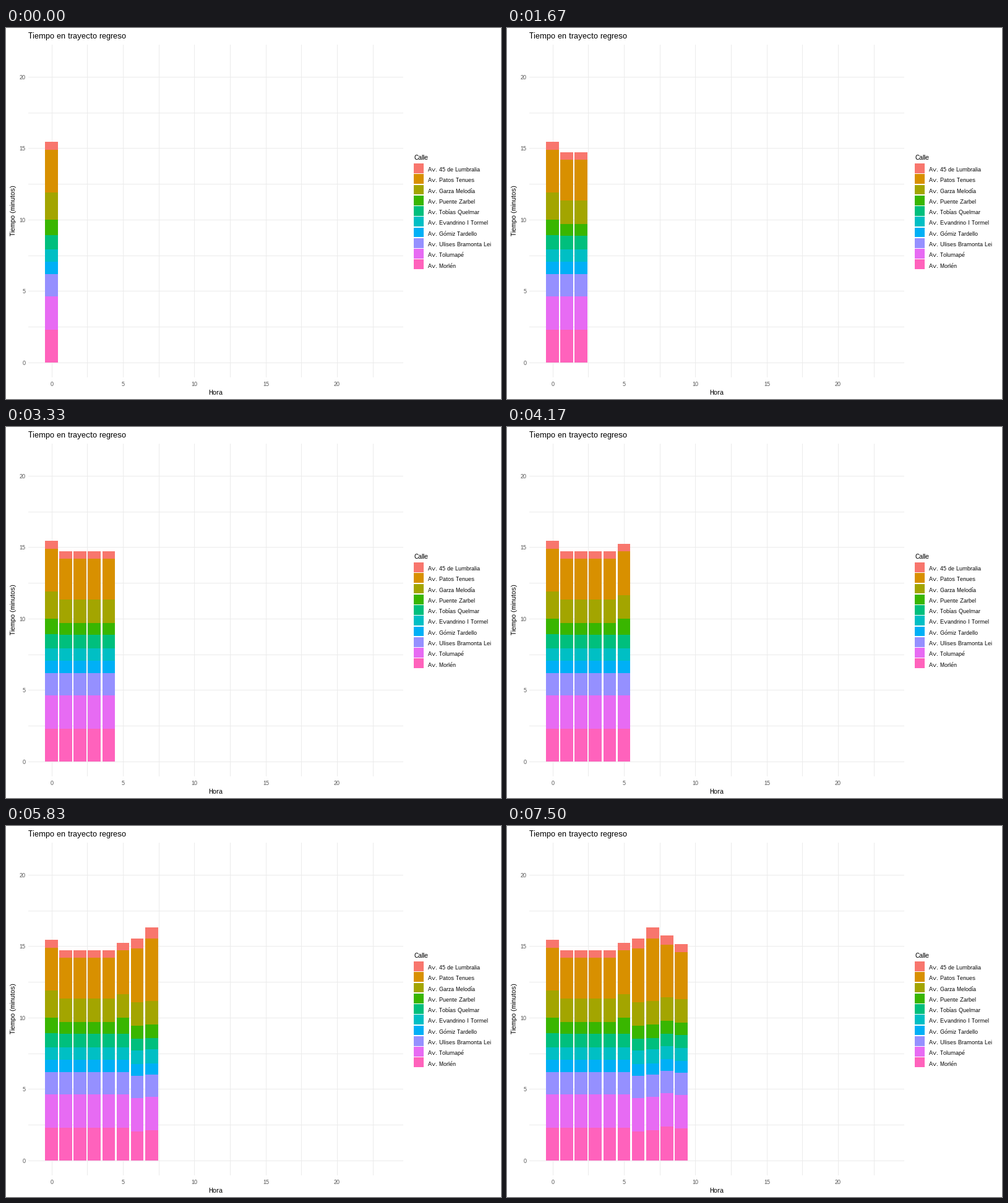
A matplotlib script for the animation above (8000 ms loop, 800 px wide and 600 px high).

```python
import math

import matplotlib.pyplot as plt
from matplotlib.animation import FuncAnimation
from matplotlib.collections import PatchCollection
from matplotlib.patches import Rectangle

W, H, DPI = 800, 600, 100
STEP_MS, LOOP_MS = 20, 8000
HOURS = 10
BASE, PITCH_X, PITCH_Y = 541, 23.08, 115.5
GRID, GREY = "#EBEBEB", "#4D4D4D"
SMALL, MEDIUM, LARGE = 9, 11, 13

# Name, colour and usual height in pixels, from the top of the stack down
STREETS = [
    ("Av. 45 de Lumbralia", "#F8766D", 12),
    ("Av. Patos Tenues", "#D89000", 66),
    ("Av. Garza Melodía", "#A3A500", 38),
    ("Av. Puente Zarbel", "#39B600", 19),
    ("Av. Tobías Quelmar", "#00BF7D", 22),
    ("Av. Evandrino I Tormel", "#00BFC4", 20),
    ("Av. Gómiz Tardello", "#00B0F6", 20),
    ("Av. Ulises Bramonta Lei", "#9590FF", 36),
    ("Av. Tolumapé", "#E76BF3", 54),
    ("Av. Morlén", "#FF62BC", 53),
]
NAMES, COLORS, USUAL = zip(*STREETS)
RED, ORANGE, OLIVE, GREEN, TEAL, CYAN, BLUE, PURPLE, VIOLET, PINK = range(10)

# Peak hour, rise and fall in hours, extra height per street
SURGES = [
    (0, 0.4, 0.2, {RED: 1, ORANGE: 3, OLIVE: 6, GREEN: 6, TEAL: 1}),
    (5, 0.4, 0.2, {GREEN: 7}),
    (6, 0.4, 2.0, {PINK: -6}),
    (7, 1.4, 1.6, {RED: 6, ORANGE: 35, GREEN: 3, TEAL: -4, CYAN: 3, BLUE: -2}),
    (8, 0.4, 0.2, {PINK: 4}),
]

plt.rcParams.update({
    "font.family": "Liberation Sans",
    "text.hinting": "native",
    "text.hinting_factor": 1,
})
fig = plt.figure(figsize=(W / DPI, H / DPI), dpi=DPI, facecolor="white")
ax = fig.add_axes([0, 0, 1, 1])
ax.set_xlim(0, W)
ax.set_ylim(H, 0)
ax.axis("off")


def boxes(rects, colors, z):
    """Add flat rectangles given as (left, top, right, bottom)."""
    patches = [Rectangle((l, t), r - l, b - t) for l, t, r, b in rects]
    group = PatchCollection(patches, facecolors=colors, linewidths=0,
                            antialiased=False, zorder=z)
    ax.add_collection(group, autolim=False)
    return group


def label(x, y, text, px, color="black", ha="left", **kw):
    ax.text(x, y, text, fontsize=px * 72 / DPI, color=color, ha=ha,
            va="baseline", **kw)


def draw_grid():
    cols = [round(73.58 + PITCH_X * 2.5 * i) for i in range(10)]
    rows = [int(BASE + 0.3 - PITCH_Y * i / 2) for i in range(9)]
    lines = [(x, 27, x + 1, 565) for x in cols]
    lines += [(36, y, 642, y + 1) for y in rows]
    boxes(lines, GRID, 1)
    for i in range(5):
        label(cols[2 * i], 579, str(5 * i), SMALL, GREY, "center")
        label(31.5, rows[2 * i] + 4, str(5 * i), SMALL, GREY, "right")


def draw_legend():
    label(659, 213, "Calle", MEDIUM)
    keys = []
    for i, name in enumerate(NAMES):
        top = 218.95 + 17.28 * i
        keys.append((659, round(top), 675, round(top + 15.85)))
        label(682, round(top + 13.1), name, SMALL)
    boxes(keys, COLORS, 2)


def surge(hour, peak, rise, fall):
    """Smooth rise to 1 at the peak, then exponential decay."""
    d = hour - peak
    return math.exp(-d / fall) if d > 0 else math.exp(-(d / rise) ** 2)


def heights(hour):
    result = list(USUAL)
    for peak, rise, fall, extras in SURGES:
        share = surge(hour, peak, rise, fall)
        for street, extra in extras.items():
            result[street] += extra * share
    return result


def draw_stack(hour):
    left = 63.2 + PITCH_X * hour
    l, r = round(left), round(left + 20.75)
    rects, bottom = [], BASE
    for height in reversed(heights(hour)):
        top = bottom - height
        rects.append((l, round(top), r, round(bottom)))
        bottom = top
    return boxes(rects, COLORS[::-1], 3)


draw_grid()
draw_legend()
label(36, 17, "Tiempo en trayecto regreso", LARGE)
label(338.5, 593, "Hora", MEDIUM, ha="center")
label(15, 295, "Tiempo (minutos)", MEDIUM, ha="center", rotation=90,
      rotation_mode="anchor")
stacks = [draw_stack(hour) for hour in range(HOURS)]


def update(i):
    # A new hour appears 1.2 times a second
    latest = (i * STEP_MS + 14) * 3 // 2500
    for hour, stack in enumerate(stacks):
        stack.set_visible(hour <= latest)
    return stacks


anim = FuncAnimation(fig, update, frames=LOOP_MS // STEP_MS, interval=STEP_MS,
                     repeat=True, repeat_delay=0, blit=False)
plt.show()
```
